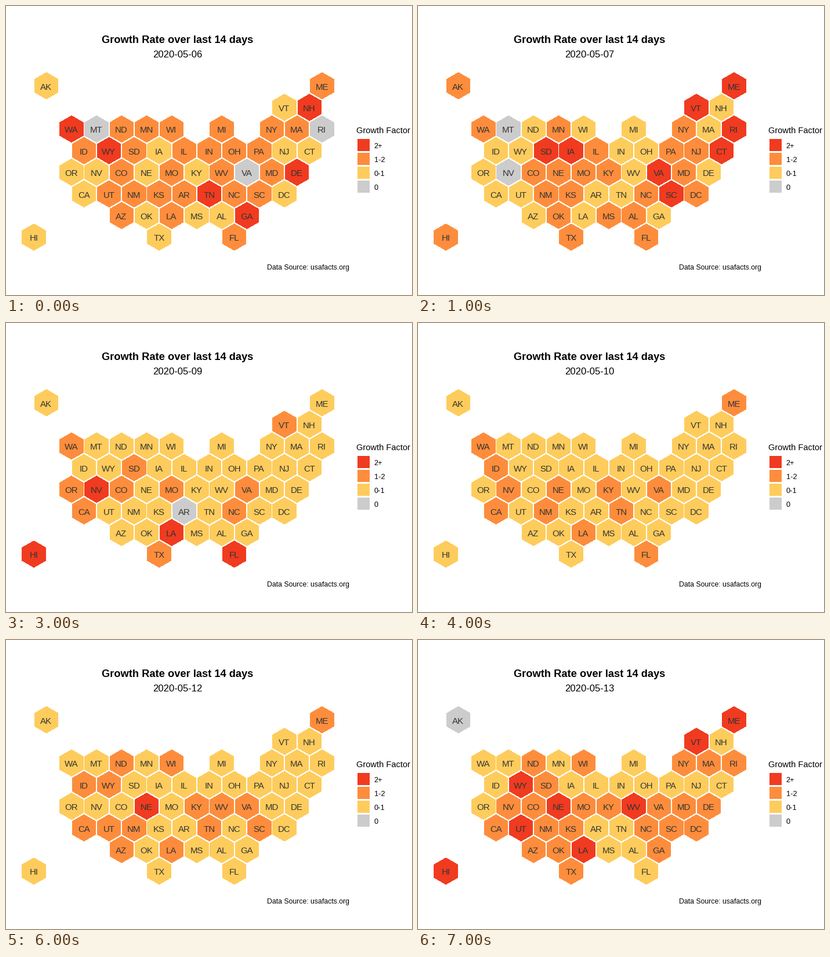
A matplotlib script that plays this animation: 700x500 px, repeating every 8 s.

```python
import math

import matplotlib.pyplot as plt
from matplotlib.animation import FuncAnimation
from matplotlib.patches import Rectangle, RegularPolygon

W, H, DPI = 700, 500, 100
COLORS = {"red": "#f03b20", "orange": "#fd8d3c",
          "yellow": "#fecc5c", "grey": "#cccccc"}
X0, Y0, HALF = 48.1, 138, 21.6      # first centre, half a tile's width
R = HALF / math.cos(math.pi / 6)

# Tile map; every other row is shifted by half a tile
GRID = """
AK .. .. .. .. .. .. .. .. .. .. ME
.. .. .. .. .. .. .. .. .. .. VT NH
.. WA MT ND MN WI .. MI .. NY MA RI
.. .. ID WY SD IA IL IN OH PA NJ CT
.. OR NV CO NE MO KY WV VA MD DE ..
.. .. CA UT NM KS AR TN NC SC DC ..
.. .. .. AZ OK LA MS AL GA .. .. ..
HI .. .. .. .. TX .. .. FL .. .. ..
"""

# One entry per day: the colour of most states, then the exceptions
DAYS = [
    dict(rest="orange", red="NH WA WY DE TN GA", grey="MT RI VA",
         yellow="AK VT IA NJ CT OR NV NE KY CA DC OK MS AL HI TX"),
    dict(rest="yellow", red="ME VT RI SD IA CT VA SC", grey="MT NV",
         orange="AK WA MN NY IL PA NJ CO NE MO KY MD NM KS NC DC "
                "OK MS AL HI TX FL"),
    dict(rest="orange", red="TN AZ", grey="NV HI",
         yellow="ME VT WA MN NY MA IA CT CO MO KY VA MD NM KS AR NC "
                "OK LA AL FL"),
    dict(rest="yellow", red="NV LA HI FL", grey="AR",
         orange="VT WA SD OR CO MO VA CA NC TX"),
    dict(rest="yellow", orange="ME WA ID NV NE KY VA CA NM TN LA FL"),
    dict(rest="yellow", red="ID NE KY NM TN", grey="VT",
         orange="AK NH WA MN MI IA IN OH VA CA SC AZ LA MS AL HI"),
    dict(rest="yellow", red="NE",
         orange="ME ND WI ID WY KY WV VA CA UT NM TN SC AZ LA"),
    dict(rest="orange", red="ME VT WY NE WV UT LA HI", grey="AK",
         yellow="NH WA MT MN MI ID IA IL IN OH PA NJ CT OR AR TN MS AL FL"),
]

plt.rcParams["font.family"] = "Liberation Sans"
fig = plt.figure(figsize=(W / DPI, H / DPI), dpi=DPI, facecolor="white")
ax = fig.add_axes([0, 0, 1, 1])
ax.set_xlim(0, W)
ax.set_ylim(H, 0)
ax.axis("off")


def pt(px):
    return px * 72 / DPI


def label(x, y, text, size, ha="left", **kw):
    return ax.text(x, y, text, fontsize=pt(size), ha=ha, va="baseline", **kw)


tiles = {}
for row, line in enumerate(GRID.split("\n")[1:-1]):
    for col, state in enumerate(line.split()):
        if state == "..":
            continue
        x = X0 + HALF * (2 * col + (row + 1) % 2)
        y = Y0 + 1.5 * R * row
        tiles[state] = ax.add_patch(RegularPolygon(
            (x, y), 6, radius=R, ec="white", lw=pt(1), antialiased=False))
        label(x - 0.3, y + 6.6, state, 15, "center", color="#333333", zorder=3)

label(296, 64, "Growth Rate over last 14 days", 18.3, "center", weight="bold")
date = label(295.6, 89, "", 16.6, "center")
label(592.5, 456, "Data Source: usafacts.org", 12.25, "right")

label(603.5, 220, "Growth Factor", 14.67)
for k, (name, color) in enumerate(zip(["2+", "1-2", "0-1", "0"],
                                      COLORS.values())):
    top = 230 + 24 * k
    ax.add_patch(Rectangle((606, top), 21, 21, fc=color, lw=0))
    label(634.7, top + 16, name, 12.7)


def draw(i):
    day = DAYS[i]
    date.set_text(f"2020-05-{6 + i:02d}")
    for state, tile in tiles.items():
        color = next((c for c in COLORS if state in day.get(c, "").split()),
                     day["rest"])
        tile.set_facecolor(COLORS[color])
    return [*tiles.values(), date]


anim = FuncAnimation(fig, draw, frames=len(DAYS), interval=1000,
                     repeat=True, repeat_delay=0)
plt.show()
```
